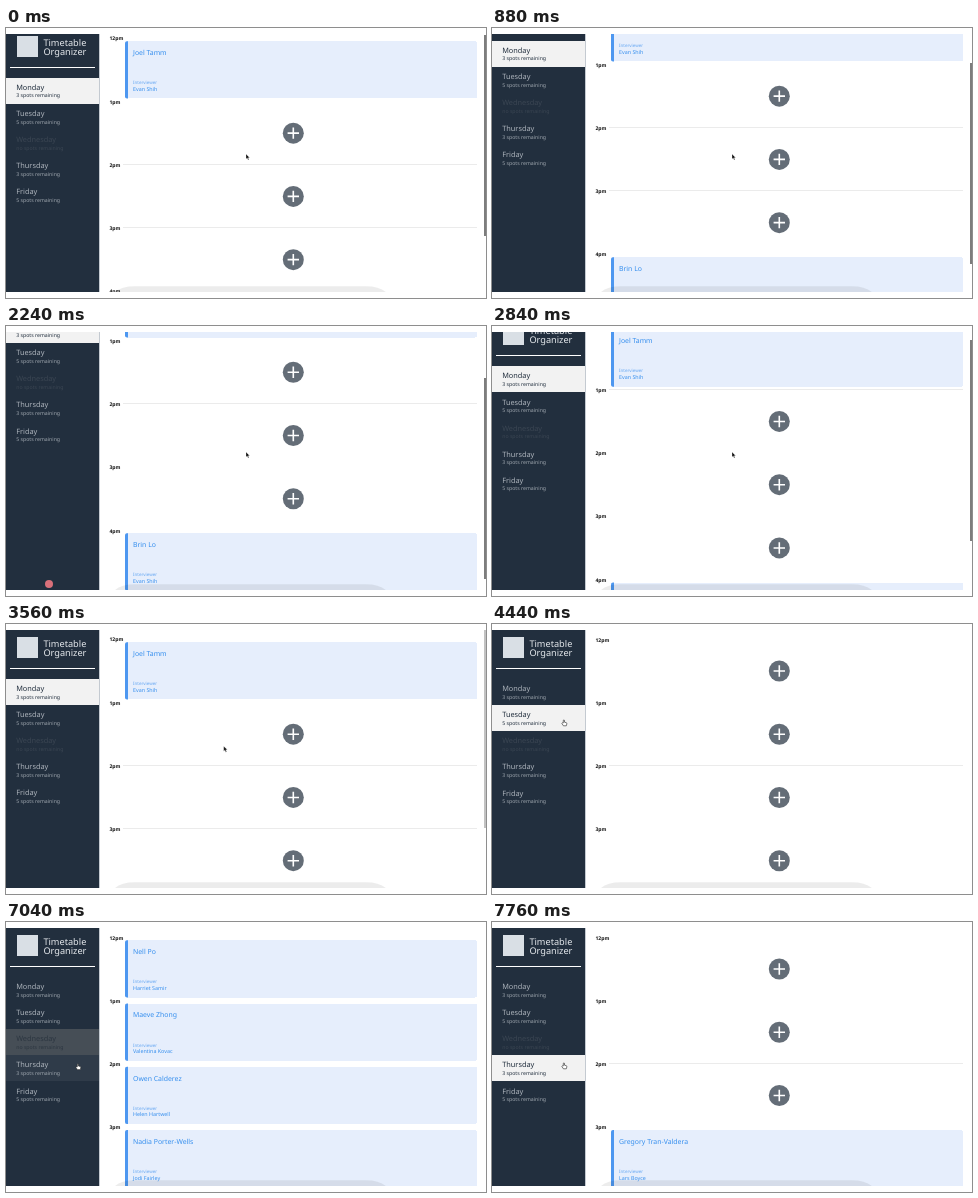
An HTML page that plays this animation: 480 by 270 pixels, repeating every 8 s.

```html
<!DOCTYPE html>
<html lang="en">
<head>
<meta charset="utf-8">
<title>Booking board</title>
<style>
html, body { margin: 0; width: 100%; height: 100%; overflow: hidden; background: #fff; }
svg { display: block; width: 480px; height: 270px; }
text { font-family: "Noto Sans", "Open Sans", sans-serif; text-rendering: geometricPrecision; white-space: pre; }
rect { shape-rendering: crispEdges; }
</style>
</head>
<body>
<svg id="stage" viewBox="0 0 480 270"></svg>
<script>
const LOOP = 8000, STEP = 40;
const ROW_TOP = 55, ROW_H = 26.05, SLOT_H = 63.25;
const NAVY = '#222f3e', BLUE = '#368fee';

const DAYS = [
  ['Monday', '3', { 0: ['Joel Tamm', 'Evan Shih'], 4: ['Brin Lo', 'Evan Shih'] }],
  ['Tuesday', '5', {}],
  ['Wednesday', 'no', {
    0: ['Nell Po', 'Harriet Samir'],
    1: ['Maeve Zhong', 'Valentina Kovac'],
    2: ['Owen Calderez', 'Helen Hartwell'],
    3: ['Nadia Porter-Wells', 'Jodi Fairley'],
    4: ['Brin Lo', 'Evan Shih']
  }],
  ['Thursday', '3', { 3: ['Gregory Tran-Valdera', 'Lars Boyce'], 4: ['Joel Tamm', 'Lars Boyce'] }],
  ['Friday', '5', {}]
];
const HOURS = ['12pm', '1pm', '2pm', '3pm', '4pm', '5pm'];

// [time, value] tracks
const SCROLL = [[520, 5.1], [880, 42.1], [1320, 75.5], [1640, 78], [1920, 78], [2240, 64],
  [2840, 14.8], [3200, 1], [3360, 1], [3600, 0]];
const CURSOR_X = [[3360, 240], [4160, 78], [4280, 72], [5120, 72], [5480, 73], [6080, 73], [6840, 72]];
const CURSOR_Y = [[3360, 126], [4160, 98], [4280, 97], [5120, 97], [5480, 120], [6080, 120], [6840, 144], [7200, 142]];
const CLICKS = [[0, 0], [4440, 1], [6040, 2], [7680, 3]];

const stage = document.getElementById('stage');

function add(parent, tag, attrs) {
  const el = document.createElementNS('http://www.w3.org/2000/svg', tag);
  set(el, attrs);
  parent.appendChild(el);
  return el;
}
function set(el, attrs) {
  for (const k in attrs) el.setAttribute(k, attrs[k]);
}
const rect = (p, x, y, width, height, fill, more) =>
  add(p, 'rect', { x, y, width, height, fill, ...more });
function label(p, x, y, size, fill, str, more) {
  const el = add(p, 'text', { x, y, 'font-size': size, fill, ...more });
  el.textContent = str;
  return el;
}

// Monotone cubic through the points of a track
function track(pts, t) {
  const n = pts.length - 1;
  if (t <= pts[0][0]) return pts[0][1];
  if (t >= pts[n][0]) return pts[n][1];
  const slope = i => (pts[i + 1][1] - pts[i][1]) / (pts[i + 1][0] - pts[i][0]);
  const tangent = i => {
    if (i === 0 || i === n) return 0;
    const a = slope(i - 1), b = slope(i);
    return a * b > 0 ? 2 * a * b / (a + b) : 0;
  };
  let i = 0;
  while (t >= pts[i + 1][0]) i++;
  const h = pts[i + 1][0] - pts[i][0], u = (t - pts[i][0]) / h;
  const u2 = u * u, u3 = u2 * u;
  return (2 * u3 - 3 * u2 + 1) * pts[i][1] + (u3 - 2 * u2 + u) * h * tangent(i)
    + (3 * u2 - 2 * u3) * pts[i + 1][1] + (u3 - u2) * h * tangent(i + 1);
}

const clip = add(add(stage, 'defs', {}), 'clipPath', { id: 'view' });
rect(clip, 0, 6, 480, 258, '#000');
const view = add(stage, 'g', { 'clip-path': 'url(#view)' });
rect(view, 0, 6, 93, 258, NAVY);
rect(view, 93, 6, 1, 258, '#c4cad1');
const lines = HOURS.map(() => rect(view, 117, 0, 354, 1, '#ebebeb'));
const page = add(view, 'g', {});

// Sidebar
rect(page, 11, 13, 21, 21, '#d9dfe5');
label(page, 37.4, 23, 9.2, '#e4e8ec', 'Timetable', { 'font-weight': 300 });
label(page, 37.4, 32, 9.2, '#e4e8ec', 'Organizer', { 'font-weight': 300 });
rect(page, 4, 44, 85, 1, '#fff');
add(page, 'circle', { cx: 43, cy: 322, r: 4, fill: '#d9707a' });

const rows = DAYS.map(([name, spots], i) => {
  const y = ROW_TOP + i * ROW_H;
  return {
    bg: rect(page, 0, y, 93, ROW_H, '#f2f2f2'),
    name: label(page, 10.2, y + 12.3, 7.35, '', name),
    sub: label(page, 10.2, y + 19.6, 5.2, '', spots + ' spots remaining')
  };
});

// Schedule
function card(p, y, [name, host]) {
  rect(p, 119, y + 18.3, 352, 57.2, '#e6eefc', { rx: 2 });
  add(p, 'path', { d: `M122 ${y + 18.3}h-1q-2 0-2 2v53.2q0 2 2 2h1z`, fill: '#4d97f0' });
  label(p, 127, y + 32, 6.9, BLUE, name);
  label(p, 127, y + 61.3, 4.5, '#64a6f2', 'Interviewer');
  label(p, 127, y + 67.8, 5.35, BLUE, host);
}
function plus(p, y) {
  add(p, 'circle', { cx: 287.3, cy: y + 47, r: 10.5, fill: '#646d77' });
  add(p, 'path', { d: `M281.6 ${y + 47}h11.4m-5.7-5.7v11.4`, stroke: '#fff', 'stroke-width': 1.6 });
}
HOURS.forEach((h, i) =>
  label(page, 103.5, 17.5 + i * SLOT_H, 5, '#111', h, { 'font-weight': 700 }));
const panels = DAYS.map(([, , booked]) => {
  const g = add(page, 'g', {});
  for (let i = 0; i < 5; i++) {
    if (booked[i]) card(g, i * SLOT_H, booked[i]);
    else plus(g, i * SLOT_H);
  }
  return g;
});

const bar = rect(view, 478, 0, 2, 201, '#7d7d7d');
add(view, 'path', { d: 'M108 265Q114 258.3 129 258.3H360Q374 258.3 381 265z', fill: '#000', opacity: 0.075 });

const arrow = add(view, 'path', {
  d: 'M0 0V5l1.2-1 .9 2 .9-.4-.9-1.9h1.6z', fill: '#111', stroke: '#fff', 'stroke-width': 0.3
});
const hand = add(view, 'path', {
  d: 'M-.7-.8Q0-1.4 .5-.7V1.2L2.4 1.7Q2.9 2 2.8 3L2.3 4.8H-.6L-2.2 2.3Q-1.9 1.5-.7 2z',
  fill: '#fff', stroke: '#222', 'stroke-width': 0.6
});

function paintRow(row, i, day, hover) {
  const on = i === day, full = DAYS[i][1] === 'no';
  let ink = '#acb3bb', sub = '#9fa7af';
  if (full) ink = sub = on ? '#2c3641' : '#3b4653';
  else if (on) ink = sub = NAVY;
  set(row.bg, {
    fill: on && full ? '#464e56' : '#f2f2f2',
    opacity: on ? 1 : hover ? 0.06 : 0
  });
  set(row.name, { fill: ink });
  set(row.sub, { fill: sub });
}

function draw(t) {
  const s = track(SCROLL, t), x = track(CURSOR_X, t), y = track(CURSOR_Y, t);
  const day = CLICKS.filter(c => t >= c[0]).pop()[1];
  const inside = x < 93;
  const over = inside ? Math.floor((y + s - ROW_TOP) / ROW_H) : -1;

  set(page, { transform: `translate(0 ${-s})` });
  rows.forEach((row, i) => paintRow(row, i, day, i === over));
  panels.forEach((g, i) => set(g, { display: i === day ? 'inline' : 'none' }));

  // Hairlines belong to free slots and only show when they fall on a whole pixel
  lines.forEach((line, i) => {
    const at = 142 + (i - 2) * SLOT_H - s, px = Math.round(at);
    const shown = !DAYS[day][2][i] && Math.abs(at - px) < 0.18;
    set(line, { y: px - 1, opacity: shown ? 1 : 0 });
  });

  set(bar, { y: 3 + 0.77 * s, opacity: Math.max(0, Math.min(1, (3700 - t) / 300)) });
  const spot = `translate(${x} ${y})`;
  set(arrow, { transform: spot, display: inside ? 'none' : 'inline' });
  set(hand, { transform: spot, display: inside ? 'inline' : 'none' });
}

const start = performance.now();
function tick() {
  const t = (performance.now() - start) % LOOP;
  draw(Math.floor(t / STEP) * STEP);
  requestAnimationFrame(tick);
}
tick();
</script>
</body>
</html>
```
